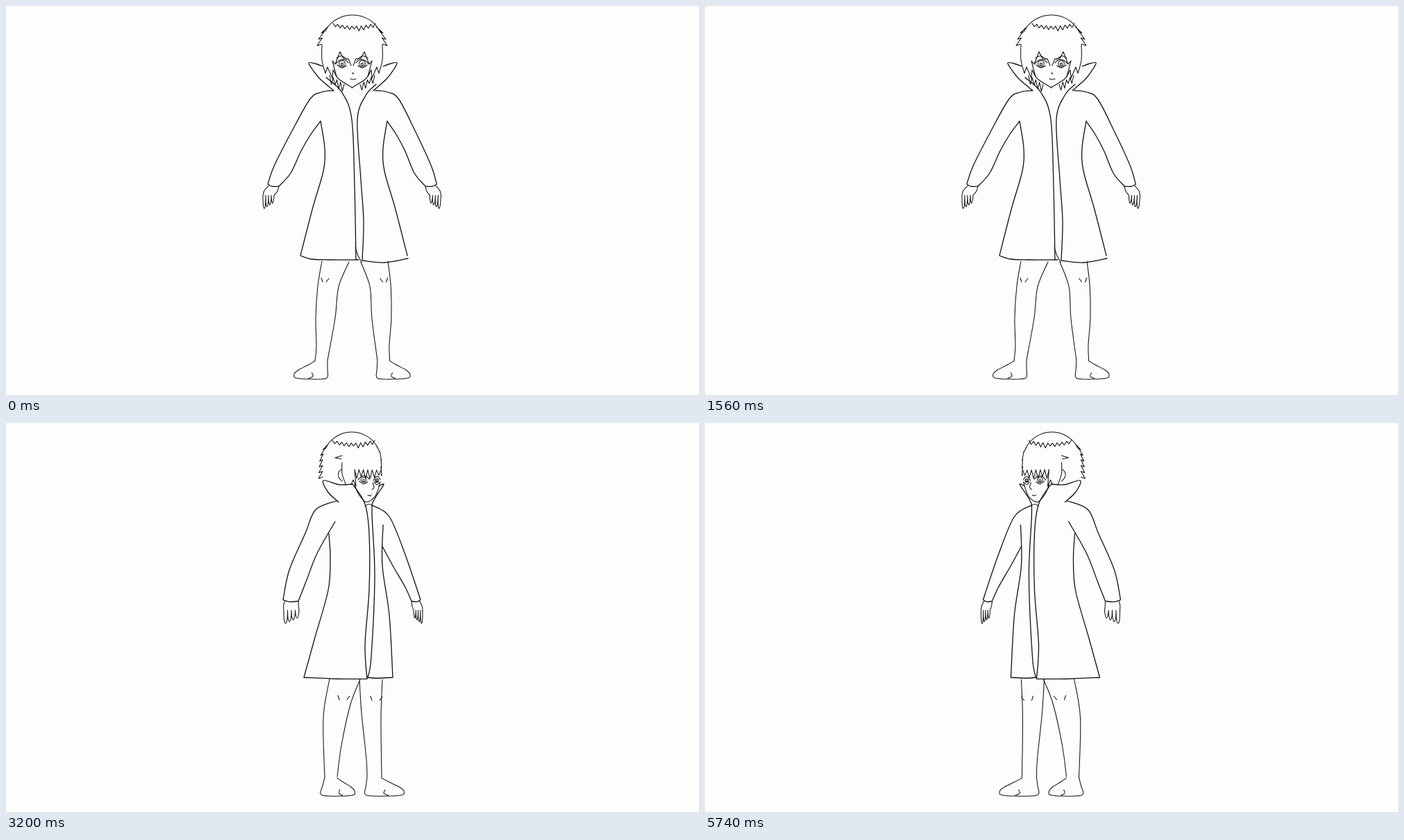
An HTML page with a canvas that plays this animation: 998x561 px, repeating every 5760 ms.

```html
<!DOCTYPE html>
<html lang="ja">
<head>
<meta charset="utf-8">
<title>Turnaround</title>
<style>
html, body { margin: 0; width: 100%; height: 100%; overflow: hidden; background: #fdfdfb; }
canvas { display: block; }
</style>
</head>
<body>
<canvas id="stage" width="998" height="561"></canvas>
<script>
const W = 998, H = 561, LOOP = 5760;
const ctx = document.getElementById('stage').getContext('2d');
const parse = s => typeof s === 'string' ? s.split(' ').map(p => p.split(',').map(Number)) : s;
const mix = (a, b, u) => a + (b - a) * u;

function seeded(n) {
  return () => (n = n * 16807 % 2147483647) / 2147483647;
}

// Collects the lines of one pose; every point passes through `place`.
class Pen {
  constructor() {
    this.thin = new Path2D();
    this.bold = new Path2D();
    this.place = (x, y) => [x, y];
    this.rnd = seeded(77);
  }
  within(move, part) {
    const outer = this.place;
    this.place = (x, y) => outer(...move(x, y));
    part();
    this.place = outer;
  }
  // Draws a part and its mirror image; `lean` tilts the mirror axis below y0.
  both(sum, part, lean = 0, y0 = 0) {
    part();
    this.within((x, y) => [sum - lean * (y - y0) - x, y], part);
  }
  curve(s, path = this.thin) {
    const p = parse(s).map(q => this.place(...q));
    path.moveTo(...p[0]);
    for (let i = 0; i < p.length - 1; i++) {
      const b = p[i], c = p[i + 1], a = p[i - 1] || b, d = p[i + 2] || c;
      path.bezierCurveTo(
        b[0] + (c[0] - a[0]) / 6, b[1] + (c[1] - a[1]) / 6,
        c[0] - (d[0] - b[0]) / 6, c[1] - (d[1] - b[1]) / 6, c[0], c[1]);
    }
  }
  coat(s) { this.curve(s, this.bold); }
  jag(s) {
    parse(s).forEach((q, i) => this.thin[i ? 'lineTo' : 'moveTo'](...this.place(...q)));
  }
  ring(x, y, r) {
    const [cx, cy] = this.place(x, y);
    this.thin.moveTo(cx + r, cy);
    this.thin.arc(cx, cy, r, 0, 7);
  }
  zigzag(x0, y0, x1, y1, n, depth, bow = 0) {
    const p = [];
    for (let i = 0; i <= n; i++) {
      const u = i / n, drop = i % 2 ? depth * (0.7 + 0.6 * this.rnd()) : 0;
      p.push([mix(x0, x1, u), mix(y0, y1, u) + bow * Math.sin(Math.PI * u) + drop]);
    }
    this.jag(p);
  }

  // Round top of the head with a jagged highlight.
  crown(cx, rx) {
    const arc = [];
    for (let a = 0.45; a < 2.7; a += 0.224)
      arc.push([cx - rx * Math.cos(a), 55 - 42 * Math.sin(a)]);
    this.curve(arc);
    this.zigzag(cx - 28, 25, cx + 33, 25, 18, 6, 4);
  }
  // Tufts standing off one side of the head (-1 left, 1 right).
  tufts(cx, rx, dir, y0, y1, n, size) {
    const edge = y => cx + dir * rx * Math.sqrt(1 - (Math.min(0, y - 55) / 42) ** 2);
    const p = [[edge(y0), y0]];
    for (let i = 1; i <= n; i++) {
      const y = mix(y0, y1, i / n), out = dir * size * mix(0.4, 1, i / n);
      p.push([edge(y) + out, y], [edge(y), y - 2]);
    }
    this.jag(p);
  }
  eye(x, y, w) {
    this.curve([[x - w, y], [x - w / 3, y - 5], [x + w / 2, y - 5], [x + w, y - 1]]);
    this.curve([[x - w * 0.8, y + 2], [x, y + 6], [x + w * 0.7, y + 3]]);
    this.ring(x, y, w * 0.48);
    this.ring(x, y + 1, w * 0.18);
  }
  sleeve(outer, inner, lean, sag = 2) {
    const a = parse(outer).at(-1), b = parse(inner)[0];
    this.coat(outer);
    this.coat(inner);
    this.coat([a, [mix(a[0], b[0], 0.4), mix(a[1], b[1], 0.4) + sag], b]);
    this.hand(a, b, lean);
  }
  hand([x0, y0], [x1, y1], lean) {
    const w = (x1 - x0) / 4, base = y1 + 13;
    for (let i = 0; i < 4; i++) {
      const x = x0 + w * i + lean, tip = y1 + 32 - 2.5 * i;
      this.curve([[x, base], [x + w * 0.1, tip - 5], [x + w / 2, tip], [x + w * 0.9, tip - 6], [x + w, base]]);
    }
    this.curve([[x0 + w * 0.4, y0 + 2], [x0 + lean * 0.7, y0 + 9], [x0 + lean, base]]);
    this.curve([[x1, y1], [x1 + lean * 0.3, y1 + 7], [x1 + lean, base]]);
  }
  // `fore` is the side of the leg above the toes.
  leg(fore, rear, toe, heel) {
    const f = parse(fore).at(-1)[0], r = parse(rear).at(-1)[0], at = u => mix(f, toe, u);
    this.curve(fore);
    this.curve(rear);
    this.curve([[f, 512], [at(0.35), 518], [at(0.8), 525], [toe, 531], [at(0.85), 537],
      [mix(f, heel, 0.5), 538], [heel, 535], [mix(r, heel, 0.5), 523], [r, 511]]);
    this.curve([[at(0.3), 537], [at(0.1), 534], [at(0.15), 529]]);
  }
  knee(x, y, w) {
    this.curve([[x, y - 6], [x + 2, y]]);
    this.curve([[x + w, y], [x + w + 4, y - 5]]);
  }
}

// Arms, coat sides and legs seen straight from the front or behind.
function body(d, toe) {
  d.both(1004, () => d.sleeve(
    '472,122 455,124 438,134 412,180 386,231 377,257',
    '393,260 410,241 425,209 439,185 453,166', -7), 0.05, 122);
  d.both(1002, () => d.coat('453,166 459,205 457,238 442,290 424,360'));
  d.both(1005, () => {
    d.leg('455,368 449,404 446,450 447,490 445,512', '494,369 479,405 474,450 463,511', toe, 463);
    d.knee(454, 398, 7);
  }, 0.05, 368);
}

function front() {
  const d = new Pen();
  d.crown(499, 44);
  d.both(997, () => {
    d.tufts(499, 44, -1, 30, 57, 3, 7);
    d.curve('455,56 455,78 460,97');
    d.jag('460,97 463,88 470,104 471,92 476,102 470,79 474,84 481,66 486,76 493,76 497,86');
    d.zigzag(466, 100, 487, 113, 8, 9);
    d.eye(484, 83, 9);
    d.curve('476,75 483,72 491,77');
    d.curve('475,99 480,106 499,118');
  });
  d.curve('499,96 500,98 501,97');
  d.curve('496,105 500,106 504,105');
  d.both(1000, () => d.coat('456,87 445,83 436,82 441,91 452,105 472,122'), -0.05, 100);
  d.coat('461,103 484,125 498,164 502,260 504,366');
  d.coat('533,113 518,129 506,164 511,250 515,310 513,367');
  d.coat('424,360 440,365 465,366 508,366');
  d.coat('513,367 545,370 579,364');
  d.curve('503,348 507,360 512,369');
  body(d, 415);
  return d;
}

function back() {
  const d = new Pen();
  d.crown(498, 44);
  d.both(992, () => {
    d.tufts(497, 45, -1, 30, 57, 4, 7);
    d.curve('453,55 450,68 453,81');
  });
  d.coat('433,82 470,81 515,82 561,80');
  d.both(997, () => d.coat('434,82 448,98 473,121'));
  d.coat('425,360 480,366 530,370 577,366');
  d.both(998, () => d.curve('452,326 458,338 456,351 446,357 437,353 437,346 444,343 448,348 444,351'));
  d.both(998, () => d.curve('452,326 454,336 448,345'));
  d.within((x, y) => [x - 2, y], () => body(d, 421));
  return d;
}

function quarter() {
  const d = new Pen();
  d.crown(498, 42);
  d.tufts(498, 42, -1, 30, 80, 6, 6);
  d.tufts(498, 42, 1, 32, 76, 4, 1);
  d.jag('484,47 474,50 483,52');
  d.curve('484,84 479,78 479,71 483,67');
  d.curve('484,57 484,73 489,88');
  d.zigzag(502, 67, 540, 68, 12, 10);
  d.jag('497,89 500,82 504,91 502,67');
  d.curve('502,89 508,103 519,114 532,105 539,85');
  d.eye(515, 82, 8);
  d.eye(534, 83, 5);
  d.curve('528,86 530,93 527,96');
  d.curve('521,104 524,105 526,104');
  // coat
  d.coat('499,88 480,89 457,83 464,100 479,114');
  d.coat('499,88 517,117 523,160 523,240 517,320 520,369');
  d.coat('537,91 544,89 530,111 527,130 531,220 526,337 521,367');
  d.curve('517,120 522,117 528,119');
  d.sleeve('477,112 446,125 431,159 408,212 399,255', '421,257 432,229 448,188 474,142', 1);
  d.sleeve('528,119 552,135 575,190 597,255', '584,257 575,237 556,204 542,178', 3);
  d.coat('465,160 467,195 464,241 445,309 429,367');
  d.coat('429,367 477,369 520,369');
  d.coat('543,147 542,206 552,277 557,367');
  d.coat('521,367 534,368 557,367');
  // legs
  d.leg('510,370 496,406 483,465 477,510', '466,369 457,425 459,512', 502, 453);
  d.leg('542,370 540,425 541,512', '509,370 512,418 519,485 520,511', 573, 517);
  d.knee(478, 399, 13);
  d.knee(525, 400, 13);
  return d;
}

function side() {
  const d = new Pen();
  d.crown(499, 43);
  d.tufts(499, 43, -1, 30, 74, 6, 5);
  d.tufts(499, 43, 1, 29, 69, 4, 1);
  d.curve('493,48 491,65 492,83');
  d.curve('489,82 486,73 491,68');
  d.jag('519,82 519,65');
  d.zigzag(519, 65, 542, 67, 8, 9);
  d.curve('542,70 538,84 541,92 536,96 538,101 534,104 537,108 535,118 529,119');
  d.eye(529, 81, 8);
  // coat
  d.coat('449,73 480,82 519,82 522,103 531,120');
  d.coat('449,73 462,99 475,116 494,124');
  d.coat('531,120 536,165 542,236 541,304 550,345 551,365');
  d.coat('551,365 520,370 470,366 436,364');
  d.coat('491,124 479,135 472,203 459,272 441,327 436,364');
  d.sleeve('488,126 479,155 480,215 485,257', '508,257 510,207 512,139', -1, -7);
  // leg
  d.leg('530,370 530,405 515,456 508,511', '486,368 492,400 487,441 491,514', 544, 488);
  d.curve('494,512 496,517');
  d.coat('526,399 527,405');
  return d;
}

const F = front(), Q = quarter(), S = side(), B = back();
const views = [
  { art: F }, { art: Q }, { art: S }, { art: B, label: '信仰' },
  { art: S, flip: true }, { art: Q, flip: true }
];

// Ticks last 20, 100 and 20 ms; one turn takes 31 ticks, six per pose.
function poseAt(t) {
  const r = t % 140;
  const tick = Math.floor(t / 140) * 3 + (r < 20 ? 0 : r < 120 ? 1 : 2);
  return views[Math.floor(tick % 31 / 6)];
}

function draw(t) {
  const { art, flip, label } = poseAt(t);
  ctx.setTransform(1, 0, 0, 1, 0, 0);
  ctx.fillStyle = '#fdfdfb';
  ctx.fillRect(0, 0, W, H);
  if (flip) ctx.setTransform(-1, 0, 0, 1, 997.5, 0);
  ctx.strokeStyle = ctx.fillStyle = '#111';
  ctx.lineCap = ctx.lineJoin = 'round';
  ctx.lineWidth = 1.05;
  ctx.stroke(art.thin);
  ctx.lineWidth = 1.3;
  ctx.stroke(art.bold);
  if (label) {
    ctx.font = '300 29px "Noto Sans CJK JP", "Noto Sans CJK", sans-serif';
    ctx.fillText(label, 471, 199);
  }
}

const start = performance.now();
function step() {
  draw((performance.now() - start) % LOOP);
  requestAnimationFrame(step);
}
step();
</script>
</body>
</html>
```
